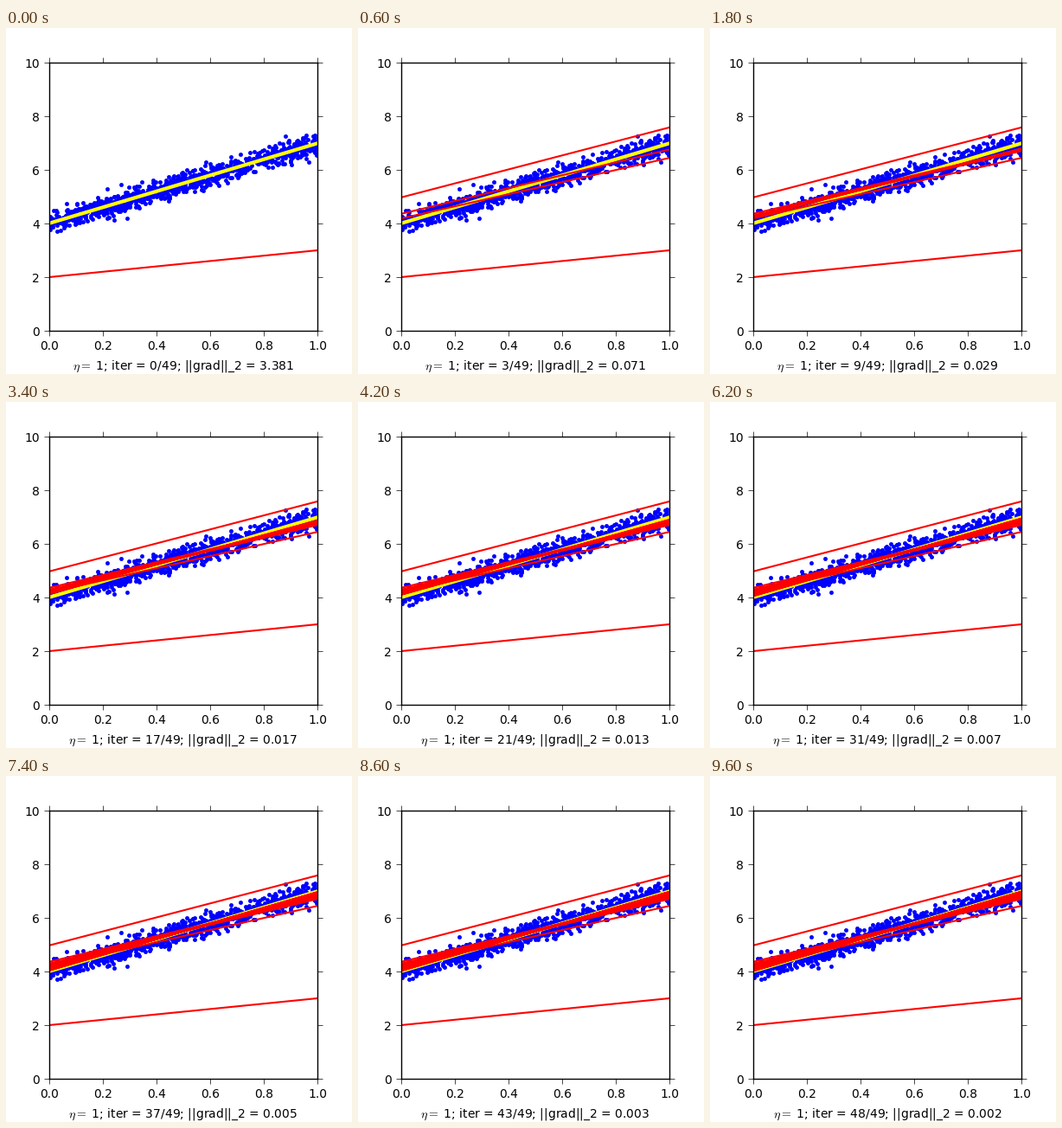
These frames come from a looping animation (400x400 px, 9.8 s). A matplotlib script:

```python
import numpy as np
import matplotlib.pyplot as plt
from matplotlib.animation import FuncAnimation

STEPS = 49
INTERVAL = 200
ETA = 1

plt.rcParams.update({
    "font.family": "DejaVu Sans",
    "font.size": 10,
    "mathtext.fontset": "cm",
    "axes.linewidth": 1.0,
    "axes.axisbelow": False,
})

# Noisy samples of y = 4 + 3x
np.random.seed(2)
x = np.random.rand(1000, 1)
y = 4 + 3 * x + 0.2 * np.random.randn(1000, 1)
design = np.hstack([np.ones_like(x), x])
best = np.linalg.lstsq(design, y, rcond=None)[0]


def grad(w):
    return design.T @ (design @ w - y) / len(x)


def descend(w, steps):
    path = [w]
    for _ in range(steps - 1):
        path.append(path[-1] - ETA * grad(path[-1]))
    return path


path = descend(np.array([[2.0], [1.0]]), STEPS)
norms = [np.linalg.norm(grad(w)) for w in path]

fig = plt.figure(figsize=(4, 4), dpi=100, facecolor="white")
ax = fig.add_axes([0.125, 0.125, 0.775, 0.775])
ax.set(xlim=(0, 1), ylim=(0, 10))
ax.tick_params(direction="out", length=4, width=0.5, pad=4,
               top=True, right=True)


def draw_line(w, color, width):
    a, b = w.ravel()
    return ax.plot([0, 1], [a, a + b], color=color, linewidth=width)[0]


ax.plot(x, y, ".", color="blue", markersize=6, markeredgewidth=0.5)
draw_line(best, "yellow", 3)
fits = [draw_line(w, "red", 1.5) for w in path]
caption = fig.text(205 / 400, 5 / 400, "", ha="center", va="baseline")


def update(i):
    for k, line in enumerate(fits):
        line.set_visible(k <= i)
    caption.set_text(rf"$\eta =$ {ETA}; iter = {i}/{STEPS}; "
                     f"||grad||_2 = {norms[i]:.3f}")
    return [*fits, caption]


anim = FuncAnimation(fig, update, frames=STEPS, interval=INTERVAL,
                     repeat=True, repeat_delay=0, blit=False)
plt.show()
```
